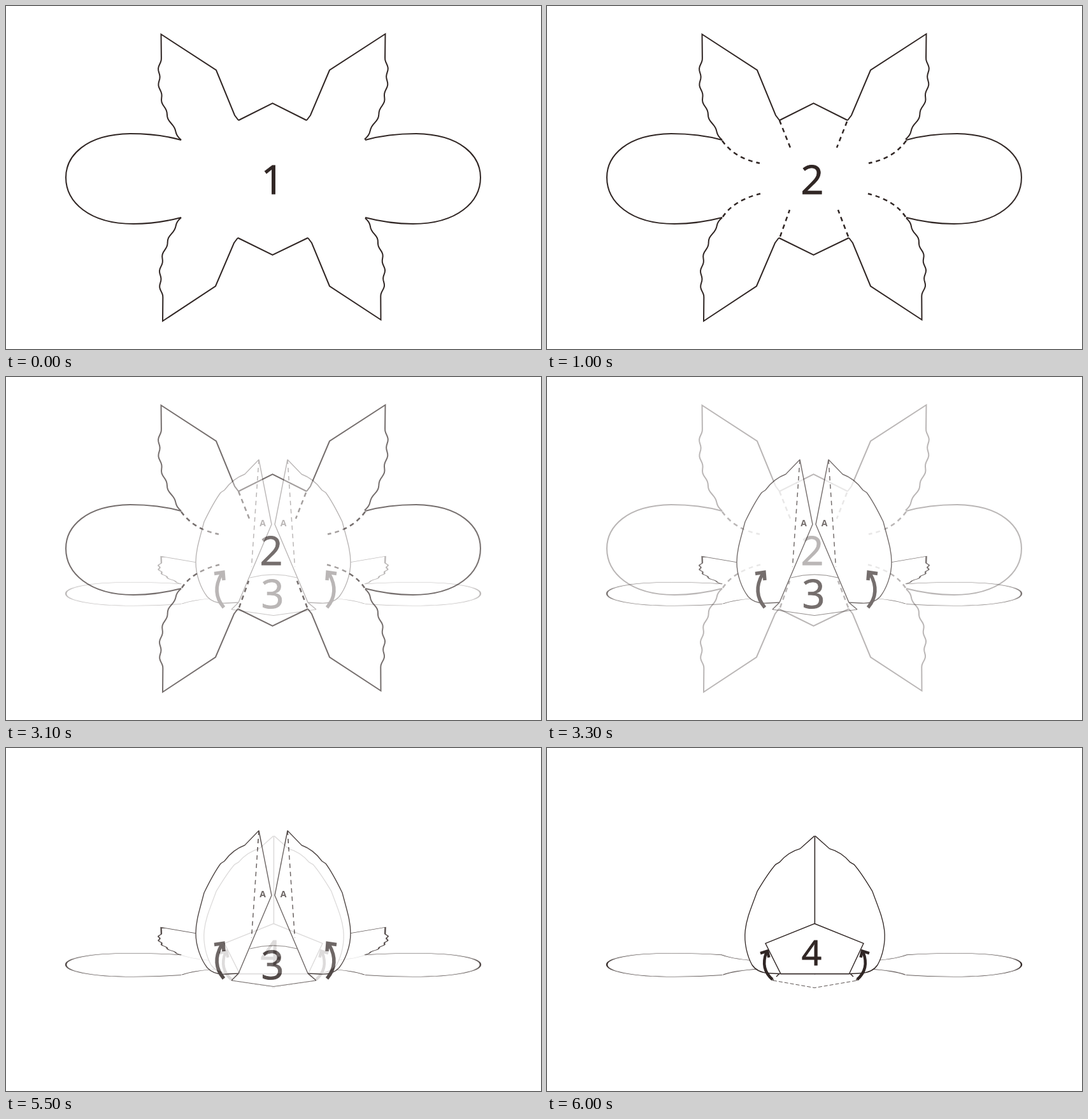
An HTML page for the animation above (8 s loop, 840 by 540 pixels).

```html
<!DOCTYPE html>
<html lang="en">
<head>
<meta charset="utf-8">
<title>Paper folding steps</title>
<style>
  html, body { margin: 0; width: 100%; height: 100%; overflow: hidden; background: #fff; }
  svg { display: block; width: 840px; height: 540px; }
  .ink { fill: none; stroke: #302624; stroke-width: 2; }
  .fine { stroke-width: 1.4; }
  .hair { stroke-width: .8; }
  .flat { stroke-width: 2.4; }
  .paper { fill: #fff; }
  .fold { stroke-width: 2.5; stroke-dasharray: 7 6; }
  .crease { stroke-width: 1.5; stroke-dasharray: 7 6; }
  .arrow { stroke-width: 5.5; }
  text { font-family: "Open Sans", "Noto Sans", sans-serif; fill: #302624; text-anchor: middle; }
  .num { font-size: 63px; stroke: #302624; stroke-width: .9; }
  .tag { font-size: 14px; font-weight: 700; }
</style>
</head>
<body>
<svg viewBox="0 0 840 540">
  <defs>
    <path id="petal" d="M275 211C250 204 220 201 195 201C125 202 94 236 94 270C94 308 130 343 200 343C227 343 252 339 275 333"/>
    <path id="foldTop" d="M275 212Q295 240 334 247.500"/>
    <path id="foldLow" d="M276 332Q293 306 335 295.500"/>
    <g id="petals"><use href="#petal"/><use href="#petal" transform="matrix(-1 0 0 1 839 0)"/></g>
    <g id="foldsTop"><use href="#foldTop"/><use href="#foldTop" transform="matrix(-1 0 0 1 839 0)"/></g>
    <g id="foldsLow"><use href="#foldLow"/><use href="#foldLow" transform="matrix(-1 0 0 1 839 0)"/></g>
    <path id="topLeaves"/>
    <path id="lowLeaves"/>
    <g id="template">
      <use href="#petals"/>
      <use href="#topLeaves"/>
      <use href="#lowLeaves"/>
      <path d="M365 180L418.500 153L472 180M364 365L418.500 392L474 365"/>
    </g>
    <path id="rim" d="M397 130L375 153Q356 160 343 178L337 182Q326 197 311 228C304 255 298 272 298 292C298 312 306 333 316 346Q326 357 345 356L365 355"/>
    <g id="wing" class="ink fine">
      <use href="#rim" class="paper"/>
      <path class="paper" d="M365 355L417 232L397 130"/>
      <path class="crease" d="M397 130L385.500 299"/>
    </g>
    <!-- the same wing, tilted until both meet in the middle -->
    <g id="wingShut" class="ink fine paper">
      <path d="M367 355.500H420.500V139"/>
      <use href="#rim" transform="translate(366.500 355.500) rotate(6.200) scale(.93 .985) translate(-365 -355)"/>
    </g>
    <g id="arrow" class="ink arrow">
      <path d="M342 363Q322 339 338.500 310"/>
      <path d="M327 309.500L341 307.500L342 320"/>
    </g>
  </defs>

  <g class="scene">
    <use href="#template" class="ink"/>
    <text class="num" x="418.500" y="296">1</text>
  </g>

  <g class="scene">
    <use href="#template" class="ink"/>
    <g class="ink fold">
      <use href="#foldsTop"/>
      <use href="#foldsLow"/>
      <path d="M365 180L382 223M471 182L455 223M366 363L381 321M473 363L457 321"/>
    </g>
    <text class="num" x="416.500" y="296">2</text>
  </g>

  <g class="scene">
    <!-- the flat template seen at a low angle -->
    <g class="ink flat" transform="matrix(1 0 0 .26 0 270.800)">
      <use href="#petals"/>
      <use href="#topLeaves"/>
      <use href="#foldsLow"/>
    </g>
    <path class="ink hair" d="M383 316Q420 306 457 316M354 366L420 375.500L487 366"/>
    <path class="ink fine" d="M365 355L354 366M474 355L487 366"/>
    <use href="#wing"/>
    <use href="#wing" transform="matrix(-1 0 0 1 839 0)"/>
    <text class="tag" x="403" y="234.500">A</text>
    <text class="tag" x="435.500" y="234.500">A</text>
    <use href="#arrow"/>
    <use href="#arrow" transform="matrix(-1 0 0 1 846 0)"/>
    <text class="num" x="418.500" y="364">3</text>
  </g>

  <g class="scene">
    <g class="ink flat" transform="matrix(1 0 0 .26 0 270.800)">
      <use href="#petals"/>
      <use href="#foldsTop"/>
      <use href="#foldsLow"/>
    </g>
    <path class="ink hair" stroke-dasharray="6 3" d="M355 366L420 377.500L487 366"/>
    <path class="ink crease" d="M365 355L354 366M476 355L487 366"/>
    <use href="#wingShut"/>
    <use href="#wingShut" transform="matrix(-1 0 0 1 841 0)"/>
    <path class="ink fine paper" d="M420 276.500L497 307.500L474.500 355.500H367L343 307.500Z"/>
    <g id="lift"><use href="#arrow" transform="translate(354 364.500) rotate(-9) scale(.82) translate(-342 -363)"/></g>
    <use href="#lift" transform="matrix(-1 0 0 1 841 0)"/>
    <text class="num" x="415.500" y="342" style="font-size:55px">4</text>
  </g>
</svg>
<script>
  const WAVES = 5, WOBBLE = 1.5, BULGE = 30, STRAIGHT = 34;

  // Frilled outer edge from root to near the tip, then straight lines to the neck.
  function leaf(root, tip, shoulder, neck) {
    const side = tip[0] < 420 ? -1 : 1;
    const endY = tip[1] + STRAIGHT * Math.sign(root[1] - tip[1]);
    const pts = [];
    for (let u = 0; u <= 1; u += 1 / 40) {
      const bow = 2 * u * (1 - u) * BULGE + WOBBLE * Math.sin(2 * Math.PI * WAVES * u);
      pts.push([root[0] + (tip[0] - root[0]) * u + side * bow, root[1] + (endY - root[1]) * u]);
    }
    const knee = [neck[0] + side * 6, neck[1] + 8 * Math.sign(tip[1] - neck[1])];
    return "M" + [...pts, tip, shoulder, knee, neck].join("L");
  }

  const setPath = (id, ...parts) => document.getElementById(id).setAttribute("d", parts.join(""));
  setPath("topLeaves",
    leaf([275, 211], [243.5, 44.5], [330, 101], [365, 180]),
    leaf([563, 210], [595.5, 44], [508, 101], [472, 180]));
  setPath("lowLeaves",
    leaf([275, 333], [246, 496], [329, 441], [364, 365]),
    leaf([564, 334], [588.5, 494], [508, 441], [474, 365]));

  const scenes = [...document.querySelectorAll(".scene")];
  const FIRST = 500, EVERY = 2500, LOOP = 8000, STEP = 100, STEPS = 6;

  // Share of the fade into scene i, in equal steps.
  function fadeIn(i, t) {
    if (i === 0) return 1;
    if (i === scenes.length) return 0;
    const step = Math.floor((t - FIRST - EVERY * (i - 1)) / STEP) + 1;
    return Math.max(0, Math.min(STEPS, step)) / STEPS;
  }

  const start = performance.now();
  function tick() {
    const t = (performance.now() - start) % LOOP;
    scenes.forEach((g, i) => {
      g.style.opacity = fadeIn(i, t) * (1 - fadeIn(i + 1, t));
    });
    requestAnimationFrame(tick);
  }
  tick();
</script>
</body>
</html>
```
